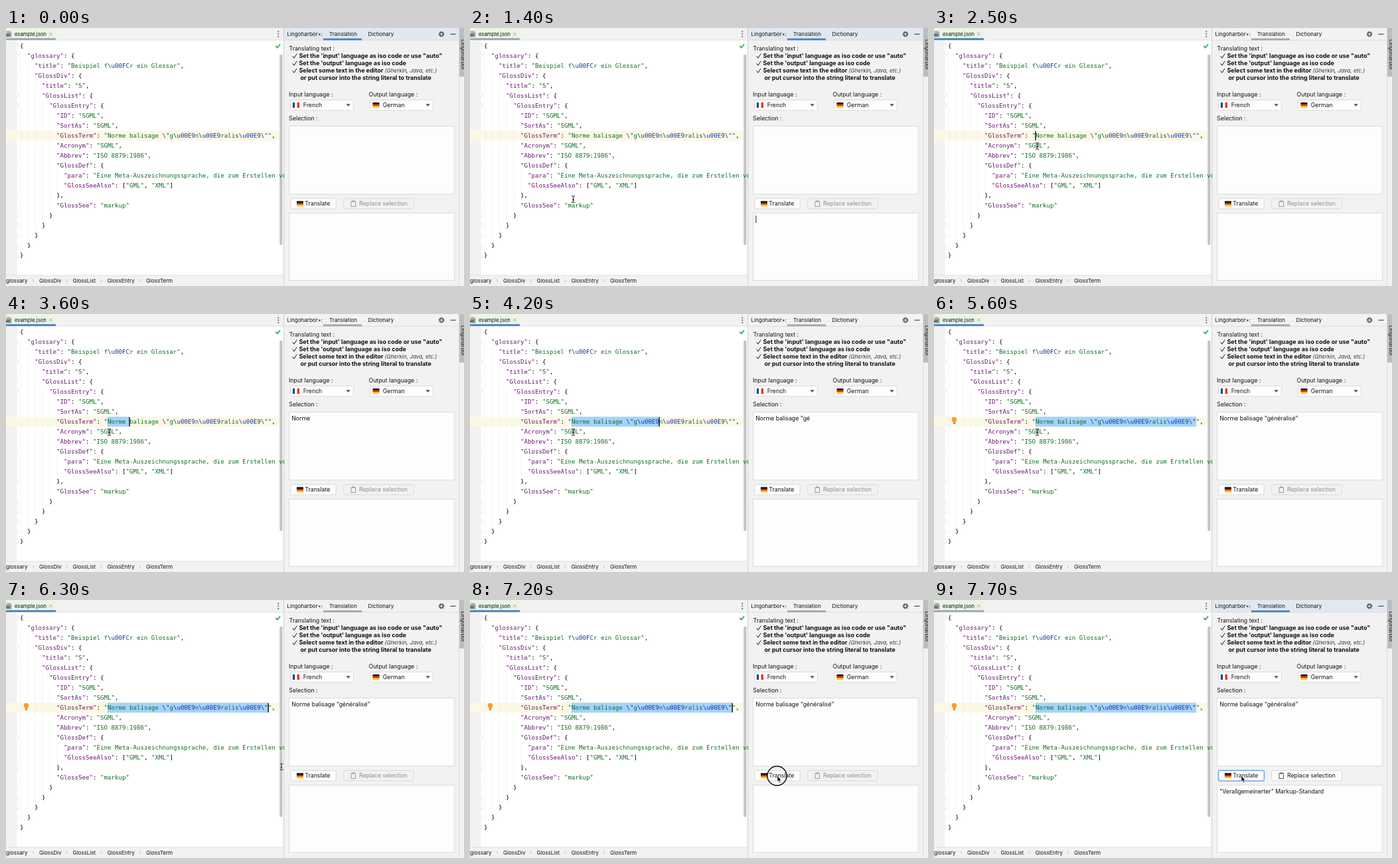
An HTML page that plays this animation: 690 by 388 pixels, repeating every 8 s.

```html
<!DOCTYPE html>
<html lang="en">
<head>
<meta charset="utf-8">
<title>Translating a JSON string</title>
<style>
html, body { margin: 0; width: 100%; height: 100%; overflow: hidden; background: #f2f2f2; }
svg { display: block; width: 690px; height: 388px; }
text { font-family: Inter, "Open Sans", sans-serif; font-size: 8.75px; fill: #111; white-space: pre; }
.small { font-size: 8.05px; }
.bold { font-weight: 700; font-size: 8.95px; }
.code text { font-family: "DejaVu Sans Mono", "Noto Sans Mono", monospace; font-size: 9.145px; fill: #080808; }
.code .key { fill: #6a1a72; }
.code .str { fill: #0f6f22; }
.code .esc { fill: #0b3a9a; }
.field { fill: #fdfdfd; stroke: #d4d4d4; stroke-width: .8; }
.line { fill: none; stroke-linecap: round; stroke-linejoin: round; }
</style>
</head>
<body>
<svg id="stage" viewBox="0 0 690 388" xmlns="http://www.w3.org/2000/svg">
  <defs>
    <clipPath id="editorClip"><rect width="420" height="372"/></clipPath>
    <clipPath id="stripeClip"><rect x="683" width="7" height="73"/></clipPath>
    <g id="german"><rect width="10" height="2.7" fill="#111"/><rect y="2.6" width="10" height="2.8" fill="#dd1c1c"/><rect y="5.3" width="10" height="2.7" fill="#fc0"/></g>
    <g id="french"><rect width="3.4" height="8" fill="#23408f"/><rect x="3.3" width="3.4" height="8" fill="#fff"/><rect x="6.6" width="3.4" height="8" fill="#e2303a"/></g>
    <path id="tick" class="line" d="M0 3.4 L2 6 L6 0" stroke="#111" stroke-width="1"/>
    <path id="arrow" d="M0 0 H6.4 L3.2 3.8 Z" fill="#555"/>
  </defs>

  <rect width="690" height="388" fill="#f2f2f2"/>

  <!-- editor -->
  <rect x="16.5" y="18" width="401.5" height="354" fill="#fff"/>
  <rect y="154.5" width="412" height="15" fill="#fcf8e6"/>
  <path id="guides" stroke="#efefef" stroke-width=".7" fill="none"/>
  <path id="folds" stroke="#dadada" stroke-width=".7" fill="#fff"/>
  <rect x="412.3" y="40" width="4.2" height="286" rx="1" fill="#c4c4c4"/>
  <path d="M418.5 0 V388" stroke="#cfcfcf" stroke-width="1"/>
  <rect id="marked" x="152.8" y="154.5" height="15" fill="#a6d2ff"/>
  <g id="code" class="code" clip-path="url(#editorClip)"></g>
  <rect id="caret" y="155" width="1.3" height="14" fill="#000"/>
  <g id="bulb">
    <circle cx="30.5" cy="158.7" r="3.8" fill="#f2a31b"/>
    <rect x="28.8" y="162.5" width="3.4" height="1.2" fill="#777"/>
    <rect x="28.8" y="164.2" width="3.4" height="1.2" fill="#777"/>
  </g>
  <path class="line" d="M406.5 27.3 l2.2 2.4 l4 -4.8" stroke="#3fa553" stroke-width="1.7"/>

  <!-- editor tab -->
  <rect width="418" height="18" fill="#f2f2f2"/>
  <rect width="75" height="18" fill="#ebf5e4"/>
  <path d="M0 18.2 H418" stroke="#d4d4d4" stroke-width=".7"/>
  <rect id="tabLine" y="15.3" width="75" height="2.8"/>
  <path d="M1 4.5 h5 l2.5 2.5 v6.5 h-7.5z" fill="#a6adb4"/>
  <rect y="8.5" width="6.5" height="4.5" fill="#70777e"/>
  <text class="small" x="13" y="12" style="font-size:7.7px">example.json</text>
  <path class="line" d="M65.3 7 l4 4 m0 -4 l-4 4" stroke="#999" stroke-width=".8"/>
  <g fill="#555"><circle cx="410.3" cy="5.4" r="1"/><circle cx="410.3" cy="9.2" r="1"/><circle cx="410.3" cy="13" r="1"/></g>

  <!-- breadcrumbs -->
  <rect y="372" width="418" height="16" fill="#f2f2f2"/>
  <path d="M0 372 H418" stroke="#d4d4d4" stroke-width=".7"/>
  <g id="crumbs"></g>

  <!-- tool window -->
  <rect id="toolBar" x="419" width="264" height="18"/>
  <path d="M419 18.3 H683" stroke="#d4d4d4" stroke-width=".7"/>
  <rect id="toolLine" x="478" y="15.6" width="58" height="2.8"/>
  <text class="small" x="423.5" y="12.3">Lingoharbor+:</text>
  <text class="small" x="487" y="12.3">Translation</text>
  <text class="small" x="545.5" y="12.3">Dictionary</text>
  <circle cx="656" cy="9.2" r="2.4" fill="none" stroke="#555" stroke-width="1.5"/>
  <circle cx="656" cy="9.2" r="3.8" fill="none" stroke="#555" stroke-width="1.3" stroke-dasharray="1.5 1.485"/>
  <path d="M669.5 9.3 h8" stroke="#444" stroke-width="1.2"/>
  <rect x="682.5" width="7.5" height="388" fill="#f2f2f2"/>
  <rect x="683" width="7" height="73" fill="#bdbdbd"/>
  <path d="M682.6 0 V388" stroke="#d2d2d2" stroke-width=".8"/>
  <g clip-path="url(#stripeClip)"><text class="small" transform="translate(686 17) rotate(90)">Lingoharbor</text></g>

  <text x="426.5" y="34.3">Translating text :</text>
  <use href="#tick" x="432" y="39.2"/><use href="#tick" x="432" y="50.2"/><use href="#tick" x="432" y="61.2"/>
  <text class="bold" x="441.5" y="45.3">Set the 'input' language as iso code or use "auto"</text>
  <text class="bold" x="441.5" y="56.3">Set the 'output' language as iso code</text>
  <text class="bold" x="441.5" y="67.3">Select some text in the editor <tspan font-weight="400" font-size="8.2" font-style="italic" fill="#333">(Gherkin, Java, etc.)</tspan></text>
  <text class="bold" x="443.5" y="78.2">or put cursor into the string literal to translate</text>

  <text x="426" y="103.2">Input language :</text>
  <text x="546.5" y="103.2">Output language :</text>
  <rect class="field" x="428.5" y="108.3" width="95" height="15.6" rx="2"/>
  <rect class="field" x="548.5" y="108.3" width="95" height="15.6" rx="2"/>
  <use href="#french" x="432" y="112"/><use href="#german" x="552.5" y="112"/>
  <text x="447.8" y="119.3">French</text>
  <text x="567.8" y="119.3">German</text>
  <use href="#arrow" x="512.4" y="114.3"/><use href="#arrow" x="632.4" y="114.3"/>
  <text x="426.3" y="138.8">Selection :</text>
  <rect class="field" x="426.5" y="147.5" width="249.3" height="102.3"/>
  <text id="picked" x="430.2" y="159.6"></text>

  <rect id="ring" x="427.6" y="255.4" width="70.8" height="17.6" rx="3.5" fill="#8fbdf0"/>
  <rect id="go" class="field" x="428.8" y="256.5" width="68.4" height="15.4" rx="2.5"/>
  <use href="#german" x="438" y="260.3"/>
  <text x="450.3" y="267.3">Translate</text>
  <rect id="swap" class="field" x="508.8" y="256.5" width="105.6" height="15.4" rx="2.5"/>
  <g id="swapIcon" fill="none" stroke-width="1"><rect x="520" y="260.8" width="6.6" height="7.6"/><path d="M521.6 260.4 h3.4" stroke-width="2"/></g>
  <text id="swapText" x="532" y="267.3">Replace selection</text>

  <rect class="field" x="426.5" y="278.3" width="249.3" height="101.5"/>
  <text id="result" x="430.2" y="290.6">"Verallgemeinerter" Markup-Standard</text>
  <rect id="outCaret" x="430.4" y="282" width="1" height="11" fill="#222"/>

  <!-- pointer -->
  <circle id="click" r="14.5" fill="none" stroke="#111" stroke-width="1.5"/>
  <g id="beam">
    <path class="line" d="M-2.2 -5 Q0 -5 0 -3.8 Q0 -5 2.2 -5 M0 -4 V4 M-2.2 5 Q0 5 0 3.8 Q0 5 2.2 5 M-1 .9 h2" stroke="#fff" stroke-width="2"/>
    <path class="line" d="M-2.2 -5 Q0 -5 0 -3.8 Q0 -5 2.2 -5 M0 -4 V4 M-2.2 5 Q0 5 0 3.8 Q0 5 2.2 5 M-1 .9 h2" stroke="#111" stroke-width="1"/>
  </g>
  <path id="pointer" d="M0 0 V8.8 L2 7 L3.4 10.2 L4.9 9.5 L3.5 6.4 H6.2 Z" fill="#000" stroke="#fff" stroke-width=".7"/>
</svg>

<script>
const LOOP = 8000, CHAR = 5.506, LEFT = 21, TOP = 26.6, PITCH = 15.02;
const ACTIVE = "#4083c9", IDLE = "#9ca7b3";
const TERM = String.raw`Norme balisage \"g\u00E9n\u00E9ralis\u00E9\"`;
const SOURCE = String.raw`{
  "glossary": {
    "title": "Beispiel f\u00FCr ein Glossar",
    "GlossDiv": {
      "title": "S",
      "GlossList": {
        "GlossEntry": {
          "ID": "SGML",
          "SortAs": "SGML",
          "GlossTerm": "${TERM}",
          "Acronym": "SGML",
          "Abbrev": "ISO 8879:1986",
          "GlossDef": {
            "para": "Eine Meta-Auszeichnungssprache, die zum Erstellen von",
            "GlossSeeAlso": ["GML", "XML"]
          },
          "GlossSee": "markup"
        }
      }
    }
  }
}`;
const lines = SOURCE.split("\n");
const $ = id => document.getElementById(id);
const rowY = i => TOP + PITCH * i;
const indentOf = s => s.search(/\S/);

function add(parent, tag, attrs, text = "") {
  const el = document.createElementNS("http://www.w3.org/2000/svg", tag);
  for (const k in attrs) el.setAttribute(k, attrs[k]);
  el.textContent = text;
  parent.append(el);
  return el;
}

function drawCode() {
  lines.forEach((line, i) => {
    const pad = indentOf(line);
    const row = add($("code"), "text", { x: LEFT + pad * CHAR, y: rowY(i) + 3 });
    const tokens = line.trim().match(/"(?:\\.|[^"\\])*"|[^"]+/g);
    tokens.forEach((tok, k) => {
      if (tok[0] !== '"') return add(row, "tspan", {}, tok);
      const isKey = (tokens[k + 1] || "").startsWith(":");
      for (const part of tok.split(/(\\u[0-9A-F]{4}|\\")/).filter(Boolean))
        add(row, "tspan", { class: part[0] === "\\" ? "esc" : isKey ? "key" : "str" }, part);
    });
  });
}

function drawGutter() {
  let guides = "", folds = "";
  const open = [];
  lines.forEach((line, i) => {
    const y = rowY(i);
    if (/^\s*}/.test(line)) {
      const start = open.pop(), x = LEFT + indentOf(line) * CHAR + 1;
      guides += `M${x} ${rowY(start) + 8} V${y - 8}`;
      folds += `M14.3 ${y + 2.5} v-3 l2.2 -2 l2.2 2 v3z`;
    }
    if (line.endsWith("{")) {
      open.push(i);
      folds += `M14.3 ${y - 2.5} v3 l2.2 2 l2.2 -2 v-3z`;
    }
  });
  $("guides").setAttribute("d", guides);
  $("folds").setAttribute("d", folds);
}

function drawCrumbs() {
  const items = [["glossary", 0], ["GlossDiv", 50], ["GlossList", 100.5], ["GlossEntry", 152.5], ["GlossTerm", 211]];
  items.forEach(([name, x], i) => {
    add($("crumbs"), "text", { class: "small", x, y: 383 }, name);
    if (i) add($("crumbs"), "path", { class: "line", d: `M${x - 10} 378.2 l1.8 1.9 l-1.8 1.9`, stroke: "#b4b4b4", "stroke-width": .8 });
  });
}

// Pointer stops: time, x, y
const path = [[900, 600, 392], [1400, 155.5, 257.5], [1500, 155.5, 257.5], [2000, 155.5, 177.5],
  [5700, 155.5, 177.5], [6500, 463, 264.5]];

function pointerAt(t) {
  const next = path.findIndex(p => p[0] > t);
  if (next < 0) return path[path.length - 1].slice(1);
  if (!next) return path[0].slice(1);
  const [t0, x0, y0] = path[next - 1], [t1, x1, y1] = path[next];
  const u = (t - t0) / (t1 - t0), e = u * u * (3 - 2 * u);
  return [x0 + (x1 - x0) * e, y0 + (y1 - y0) * e];
}

const decode = s => s
  .replace(/\\u([0-9A-F]{4})/g, (_, hex) => String.fromCharCode(parseInt(hex, 16)))
  .replace(/\\"/g, '"');
const within = (t, ...spans) => spans.some(([a, b]) => t >= a && t < b);
const show = (id, on) => $(id).setAttribute("visibility", on ? "visible" : "hidden");
const paint = (id, attr, value) => $(id).setAttribute(attr, value);

function render(now) {
  const t = Math.floor(now % LOOP / 100) * 100;
  const count = Math.max(0, Math.min(TERM.length, 3 * (t - 3400) / 100));
  const [x, y] = pointerAt(t);
  const overCode = x < 418;
  const editing = within(t, [2100, 7300]);
  const done = t >= 7600;

  paint("marked", "width", count * CHAR);
  paint("caret", "x", 152.3 + count * CHAR);
  show("caret", within(t, [2200, 3000], [3500, 5400], [5900, 6400], [6900, 7300]));
  show("outCaret", within(t, [400, 900], [1400, 1900]));
  show("bulb", t >= 5300);
  paint("tabLine", "fill", editing ? ACTIVE : IDLE);
  paint("toolLine", "fill", editing ? IDLE : ACTIVE);
  paint("toolBar", "fill", editing ? "#f2f2f2" : "#e2e8f1");
  $("picked").textContent = decode(TERM.slice(0, count));

  show("ring", t >= 7300);
  paint("go", "style", t >= 7300 ? "stroke:#4c8bd0" : "");
  paint("swap", "style", done ? "" : "fill:#f2f2f2");
  paint("swapIcon", "stroke", done ? "#555" : "#999");
  paint("swapText", "style", done ? "" : "fill:#8c8c8c");
  show("result", done);

  const place = `translate(${x} ${y})`;
  const field = overCode || y > 278;
  paint("beam", "transform", place);
  paint("pointer", "transform", place);
  paint("click", "transform", `translate(${x - .5} ${y})`);
  show("beam", t >= 900 && field);
  show("pointer", t >= 900 && !field);
  show("click", within(t, [2100, 2300], [7200, 7400]));
}

drawCode();
drawGutter();
drawCrumbs();
const start = performance.now();
function tick() {
  render(performance.now() - start);
  requestAnimationFrame(tick);
}
tick();
</script>
</body>
</html>
```
